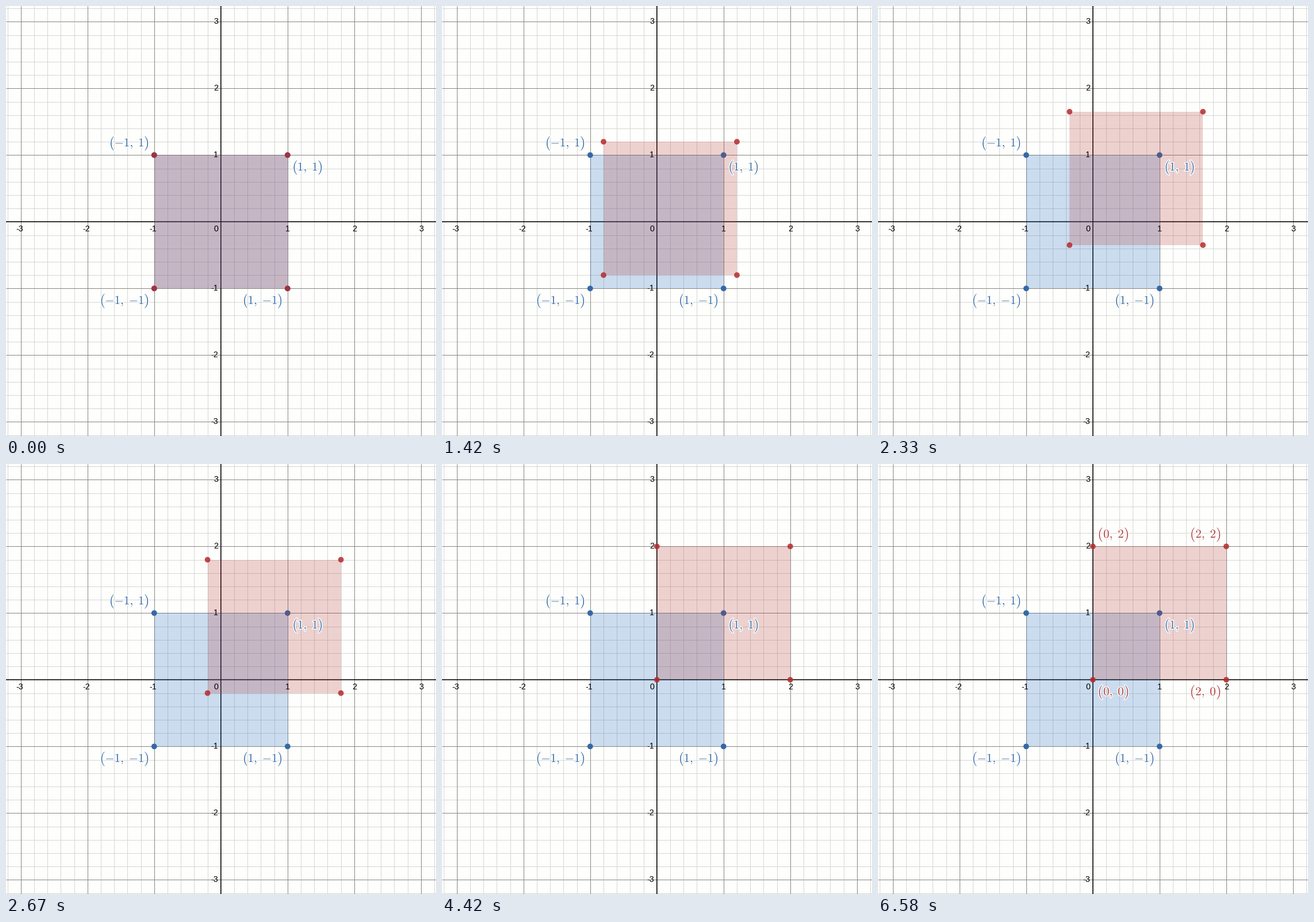
Write a matplotlib script that moves like this. It is 748 by 748 pixels and loops after 6.66 s.

```python
import math

import matplotlib
import matplotlib.pyplot as plt
from matplotlib.animation import FuncAnimation
from matplotlib.collections import LineCollection
from matplotlib.patches import Circle, PathPatch, Rectangle
from matplotlib.path import Path
from matplotlib.patheffects import withStroke
from matplotlib.textpath import TextPath
from matplotlib.transforms import Affine2D

SIZE, DPI = 748, 64
UNIT = 116                  # pixels per grid unit
X0, Y0 = 373.8, 375.3       # origin in pixels
PT = 72 / DPI               # points per pixel
LOOP, STEP = 6660, 30       # ms
FPS = 12                    # the pose is held at this rate

BLUE, RED = "#3468a6", "#b42a2c"
BLUE_FILL, RED_FILL = "#1565c0", "#b43232"
BLUE_TEXT, RED_TEXT = "#346ca4", "#b03c3c"

matplotlib.rcParams["mathtext.fontset"] = "cm"
fig = plt.figure(figsize=(SIZE / DPI, SIZE / DPI), dpi=DPI, facecolor="#fefefc")
ax = fig.add_axes([0, 0, 1, 1])
ax.axis("off")
LEFT, RIGHT = -X0 / UNIT, (SIZE - X0) / UNIT
BOTTOM, TOP = (Y0 - SIZE) / UNIT, Y0 / UNIT
ax.set(xlim=(LEFT, RIGHT), ylim=(BOTTOM, TOP))


def cross_lines(values, color, width, z, snap=True):
    lines = [[(v, BOTTOM), (v, TOP)] for v in values]
    lines += [[(LEFT, v), (RIGHT, v)] for v in values]
    ax.add_collection(LineCollection(lines, colors=color, linewidths=width * PT,
                                     zorder=z, snap=snap), autolim=False)


def square(color, z):
    return ax.add_patch(Rectangle((-1, -1), 2, 2, facecolor=color, alpha=0.22,
                                  linewidth=0, zorder=z))


def dot(x, y, color, z, alpha=1):
    return ax.add_patch(Circle((x, y), 4.9 / UNIT, facecolor=color, alpha=alpha,
                               linewidth=0, zorder=z))


def tick(text, x, y, ha):
    """Axis number at a pixel position, y being its baseline."""
    ax.text((x - X0) / UNIT, (Y0 - y) / UNIT, text, ha=ha, va="baseline",
            family="Liberation Sans", fontsize=14.2 * PT, zorder=6)


def pair_path(x, y):
    """Outline of "(x, y)" in pixels with tall brackets, and its width."""
    inner = f"{x},\\;{y}".replace("-", "{-}")
    parts, pen = [], 0
    for text, size, drop in (("(", 25, 1), (inner, 21, 0), (")", 25, 1)):
        path = TextPath((0, 0), f"${text}$", size=size)
        box = path.get_extents()
        parts.append(path.transformed(Affine2D().translate(pen - box.x0, -drop)))
        pen += box.width + 2.4
    return Path.make_compound_path(*parts), pen - 2.4


def coords(x, y, side, above, color):
    """Coordinate pair beside its point; side is -1 for left, 1 for right."""
    path, width = pair_path(x, y)
    dx = 10.7 if side > 0 else -10.7 - width
    dy = 15 if above else -27
    place = Affine2D().translate(dx, dy).scale(1 / UNIT).translate(x, y)
    return ax.add_patch(PathPatch(
        path.transformed(place), color=color, linewidth=0, zorder=8,
        path_effects=[withStroke(linewidth=3 * PT, foreground="white")]))


# grid, axes and numbers
cross_lines([k / 5 for k in range(-16, 17) if k % 5], "#d6d6d4", 1, 1)
cross_lines([k for k in range(-3, 4) if k], "#868686", 1, 1.1)
cross_lines([0], "black", 1.6, 1.2, snap=False)
for k in range(-3, 4):
    if k:
        tick(str(k), X0 + UNIT * k + (0.3 if k > 0 else -1.8), 391.5, "center")
        tick(str(k), 369.2, Y0 - UNIT * k + 4, "right")
tick("0", 369.2, 391.5, "right")

# fixed square below, moving square above
corners = [(-1, 1), (1, 1), (1, -1), (-1, -1)]
square(BLUE_FILL, 2)
for x, y in corners:
    dot(x, y, BLUE, 3)
moving = square(RED_FILL, 4)
moving_dots = [dot(x, y, RED, 7, 0.85) for x, y in corners]

coords(-1, 1, -1, True, BLUE_TEXT)
coords(1, 1, 1, False, BLUE_TEXT)
coords(-1, -1, -1, False, BLUE_TEXT)
coords(1, -1, -1, False, BLUE_TEXT)
final_labels = [coords(x, y, 1 if x == 0 else -1, y == 2, RED_TEXT)
                for x in (0, 2) for y in (0, 2)]


def draw(i):
    pose = math.floor((i * STEP + 30) * FPS / 1000)
    seconds = pose / FPS
    # one unit in two seconds, in steps of 0.05
    progress = min(max((seconds - 1) / 2, 0), 1)
    shift = math.floor(progress * 20 + 1e-6) / 20
    moving.set_xy((shift - 1, shift - 1))
    for circle, (x, y) in zip(moving_dots, corners):
        circle.center = x + shift, y + shift
    for label in final_labels:
        label.set_visible(seconds >= 5)
    return [moving, *moving_dots, *final_labels]


anim = FuncAnimation(fig, draw, frames=LOOP // STEP, interval=STEP,
                     repeat=True, repeat_delay=0)
plt.show()
```
